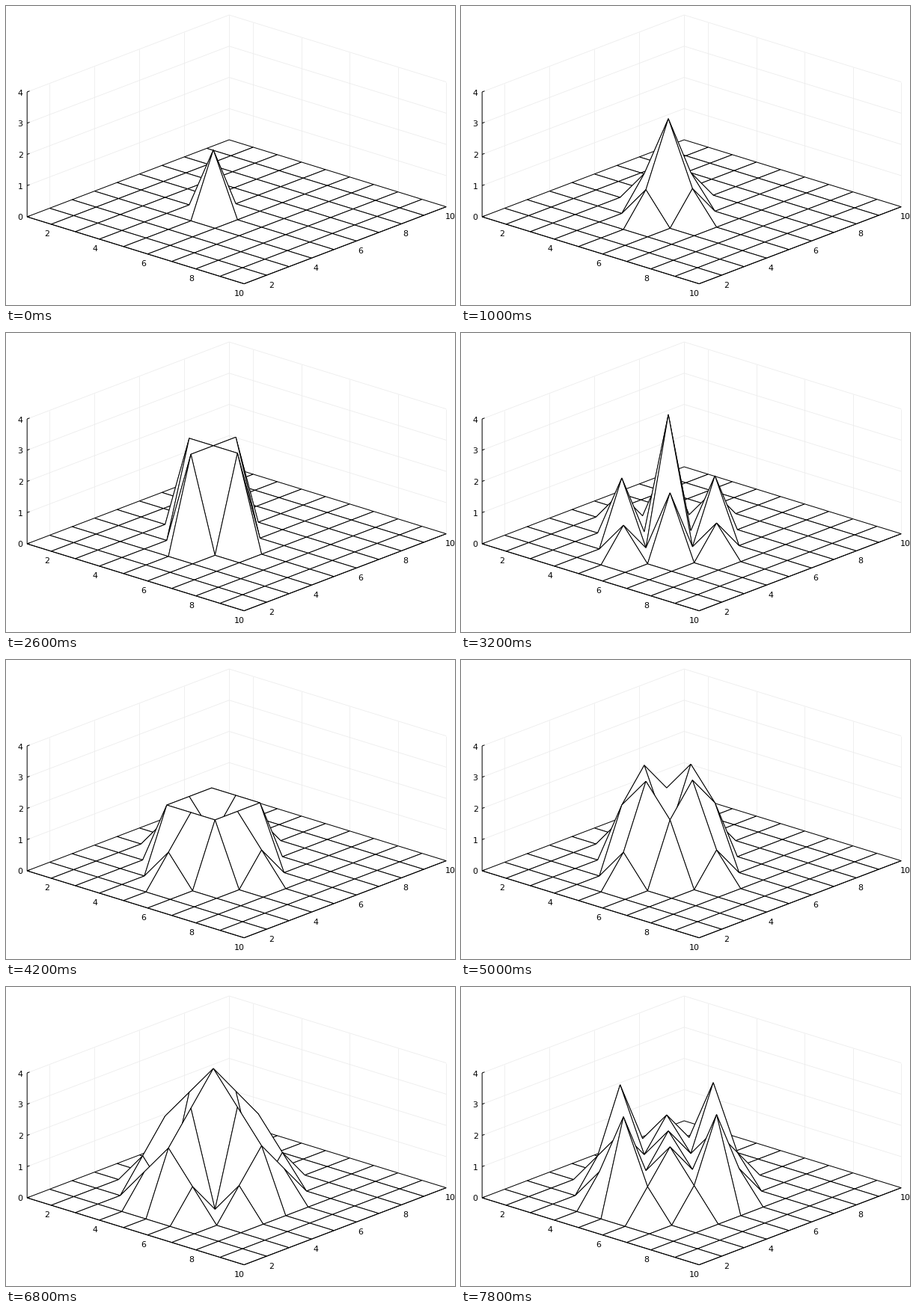
A matplotlib script that plays this animation: 600 px wide and 400 px high, repeating every 8 s.

```python
import numpy as np
import matplotlib.pyplot as plt
from matplotlib.animation import FuncAnimation
from matplotlib.collections import PolyCollection

W, H, DPI = 600, 400, 100
N, FRAMES, STEP_MS = 10, 40, 200
PX = 72 / DPI  # one pixel in points

ORIGIN = np.array([28.2, 282.0])
EX = np.array([290 / 9, 89.6 / 9])
EY = np.array([270 / 9, -103 / 9])
EZ = np.array([0, -41.75])


def project(x, y, z=0):
    return ORIGIN + (x - 1) * EX + (y - 1) * EY + z * EZ


def topple(pile):
    """One parallel toppling of every cell holding four grains or more."""
    full = (pile >= 4).astype(int)
    wide = np.pad(full, 1)
    gain = wide[:-2, 1:-1] + wide[2:, 1:-1] + wide[1:-1, :-2] + wide[1:-1, 2:]
    return pile - 4 * full + gain


def sandpile(count):
    """Drop a grain on the centre whenever the pile is stable, then topple."""
    pile = np.zeros((N, N), int)
    states = []
    for _ in range(count):
        if pile.max() < 4:
            pile[4, 4] += 1
        pile = topple(pile)
        states.append(pile)
    return states


def quads(pile):
    """Surface cells ordered from back to front."""
    cells = []
    for j in range(N - 2, -1, -1):
        for i in range(N - 1):
            ring = [(i, j), (i + 1, j), (i + 1, j + 1), (i, j + 1)]
            cells.append([project(a + 1, b + 1, pile[a, b]) for a, b in ring])
    return cells


fig = plt.figure(figsize=(W / DPI, H / DPI), dpi=DPI, facecolor="white")
ax = fig.add_axes([0, 0, 1, 1])
ax.set_xlim(0, W)
ax.set_ylim(H, 0)
ax.axis("off")


def line(*points, color="black", width=1.0, z=3):
    xs, ys = zip(*points)
    ax.plot(xs, ys, color=color, lw=width * PX, zorder=z,
            solid_capstyle="butt", solid_joinstyle="miter")


def label(pos, value, align="center"):
    ax.text(*pos, str(value), fontsize=11 * PX, family="DejaVu Sans",
            ha=align, va="center_baseline", zorder=4)


# Back walls
grid = dict(color="#ececec", width=0.8, z=1)
for t in range(2, N + 1, 2):
    line(project(1, t), project(1, t, 4), **grid)
    line(project(t, N), project(t, N, 4), **grid)
for h in range(5):
    line(project(1, 1, h), project(1, N, h), project(N, N, h), **grid)

# Axes, ticks and labels
line(project(1, 1, 4), project(1, 1), project(N, 1), project(N, N))
for h in range(5):
    p = project(1, 1, h)
    line(p, p + 0.11 * EY)
    label(p + (-5.6, 0.5), h, "right")
for t in range(2, N + 1, 2):
    label(project(t, 1) + (-6, 12.4), t)
    label(project(N, t) + (6, 12.4), t)

states = sandpile(FRAMES)
surface = PolyCollection(quads(states[0]), facecolors="white",
                         edgecolors="black", linewidths=PX,
                         joinstyle="miter", zorder=2)
ax.add_collection(surface, autolim=False)


def update(k):
    surface.set_verts(quads(states[k]))
    return (surface,)


anim = FuncAnimation(fig, update, frames=FRAMES, interval=STEP_MS,
                     repeat=True, repeat_delay=0, blit=False)
plt.show()
```
